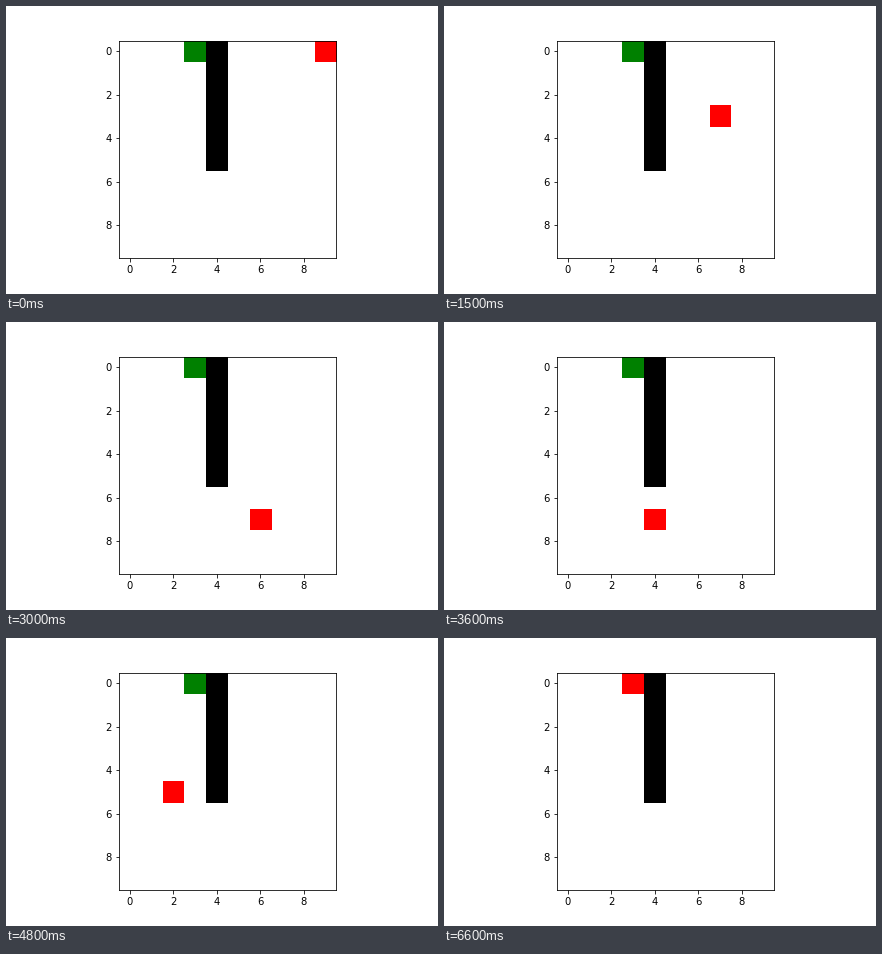
Recreate the animation shown at these times as a matplotlib script. Size 432x288 px, loop 6900 ms.

```python
import matplotlib.pyplot as plt
import numpy as np
from matplotlib.animation import FuncAnimation

SIZE = 10
STEP_MS = 300
GOAL = (0, 3)
WHITE, BLACK = (255, 255, 255), (0, 0, 0)
RED, GREEN = (255, 0, 0), (0, 128, 0)

# Corners of the walk as (row, column).
CORNERS = [(0, 9), (0, 8), (2, 8), (2, 7), (7, 7), (7, 3),
           (5, 3), (5, 2), (0, 2), (0, 3)]


def walk(corners):
    """List every cell passed when moving straight from corner to corner."""
    cells = [corners[0]]
    for row, col in corners[1:]:
        while cells[-1] != (row, col):
            r, c = cells[-1]
            cells.append((r + int(np.sign(row - r)), c + int(np.sign(col - c))))
    return cells


def make_grid(cell):
    grid = np.full((SIZE, SIZE, 3), WHITE, dtype=np.uint8)
    grid[:6, 4] = BLACK
    grid[GOAL] = GREEN
    grid[cell] = RED
    return grid


PATH = walk(CORNERS)

plt.rcParams.update({"font.family": "DejaVu Sans", "font.size": 10})
fig = plt.figure(figsize=(6, 4), dpi=72, facecolor="white")
fig.subplots_adjust(left=0.125, right=0.9, bottom=0.125, top=0.88)
ax = fig.add_subplot()
image = ax.imshow(make_grid(PATH[0]), interpolation="nearest")
ax.set_xticks(range(0, SIZE, 2))
ax.set_yticks(range(0, SIZE, 2))


def update(i):
    image.set_data(make_grid(PATH[i]))
    return [image]


anim = FuncAnimation(fig, update, frames=len(PATH), interval=STEP_MS,
                     repeat=True, repeat_delay=0, blit=False)
plt.show()
```
